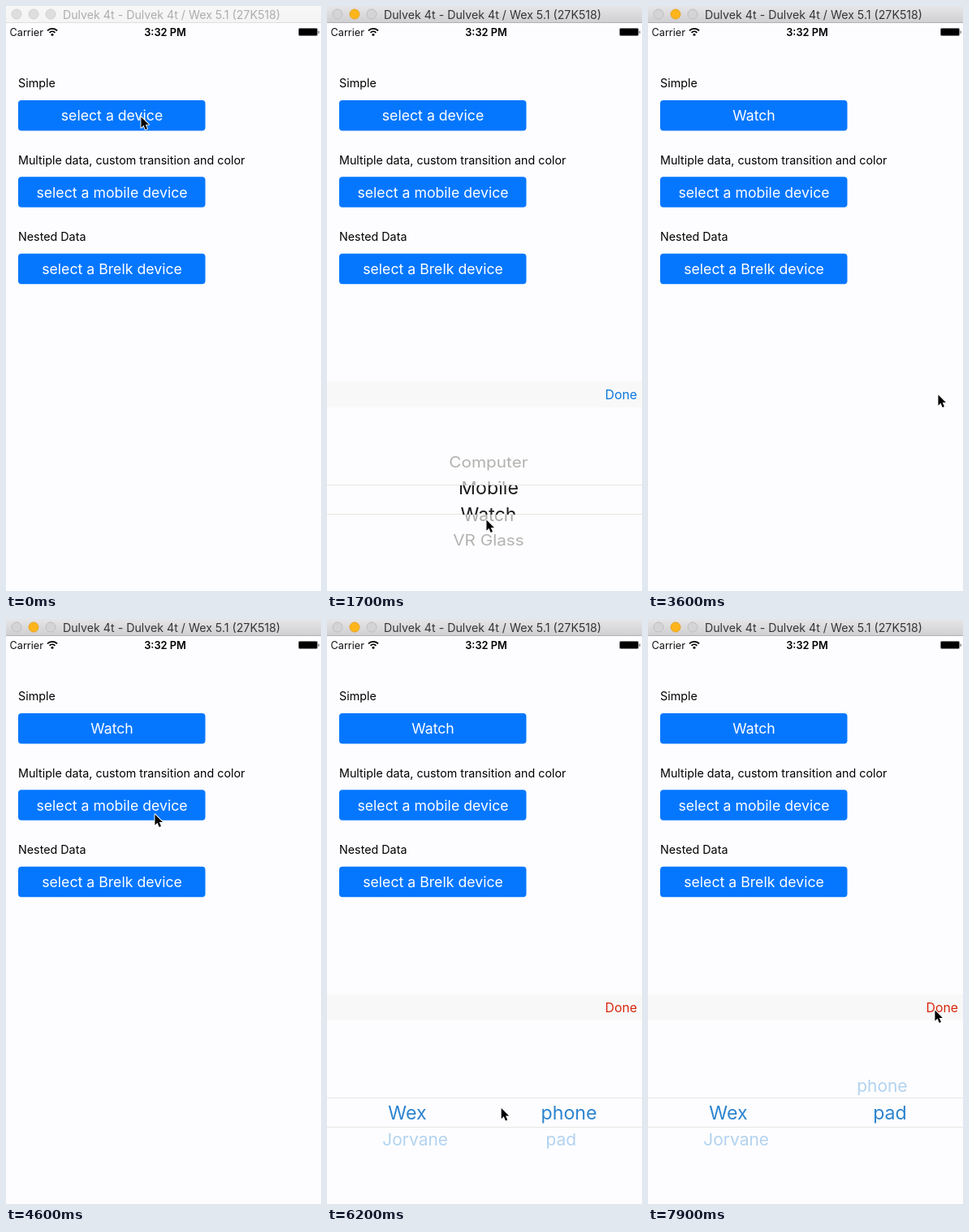
An HTML page with a canvas that plays this animation: 388 by 720 pixels, repeating every 8 s.

```html
<!DOCTYPE html>
<html lang="en">
<head>
<meta charset="utf-8">
<title>Picker demo</title>
<style>
html, body { margin: 0; width: 100%; height: 100%; overflow: hidden; background: #fdfdff; }
canvas { display: block; width: 388px; height: 720px; }
</style>
</head>
<body>
<canvas id="stage"></canvas>
<script>
const W = 388, H = 720, LOOP = 8000, STEP = 100;
const PAPER = '#fdfdff', LINE = '#e6e6e4';
const canvas = document.getElementById('stage');
const ctx = canvas.getContext('2d');
const dpr = window.devicePixelRatio || 1;
canvas.width = W * dpr;
canvas.height = H * dpr;

const clamp = u => Math.max(0, Math.min(1, u));
const span = (t, a, b) => clamp((t - a) / (b - a));
const smooth = u => (1 - Math.cos(Math.PI * u)) / 2;
const easeOut = u => 1 - Math.pow(1 - u, 3);
const mix = (a, b, u) => a + (b - a) * u;

// Cursor stops: time, x, y
const path = [
  [0, 166, 136], [300, 166, 138], [700, 176, 180], [900, 183, 221],
  [1300, 190, 692], [1400, 190, 692], [1850, 198, 612], [2100, 200, 606],
  [2600, 345, 489], [2800, 357, 478], [3700, 357, 478], [4400, 183, 238],
  [4600, 183, 240], [4900, 184, 240], [5500, 215, 567], [5800, 215, 600],
  [6400, 214, 602], [7000, 212, 552], [7300, 212, 552], [7900, 353, 481]
];

function cursorAt(t) {
  let i = 0;
  while (i < path.length - 2 && path[i + 1][0] <= t) i++;
  const [t0, x0, y0] = path[i], [t1, x1, y1] = path[i + 1];
  const u = smooth(span(t, t0, t1));
  return [mix(x0, x1, u), mix(y0, y1, u)];
}

// y is the middle of the capital letters
function text(str, x, y, size, color, align = 'left', weight = 400) {
  ctx.font = `${weight} ${size}px Inter, Roboto, sans-serif`;
  ctx.textAlign = align;
  ctx.fillStyle = color;
  ctx.fillText(str, x, y + size * 0.364);
}

function rect(x, y, w, h, color, r = 0) {
  ctx.fillStyle = color;
  ctx.beginPath();
  ctx.roundRect(x, y, w, h, r);
  ctx.fill();
}

function dot(x, y, r, fill, stroke) {
  ctx.beginPath();
  ctx.arc(x, y, r, 0, 7);
  ctx.fillStyle = fill;
  ctx.fill();
  if (stroke) {
    ctx.strokeStyle = stroke;
    ctx.lineWidth = 1;
    ctx.stroke();
  }
}

function titleBar(active) {
  const g = ctx.createLinearGradient(0, 0, 0, 20);
  g.addColorStop(0, active ? '#e6e5e7' : '#f7f7f7');
  g.addColorStop(1, active ? '#d0cfd2' : '#f4f4f4');
  rect(0, 0, W, 20, g);
  rect(0, 20, W, 1, active ? '#b2b1b4' : '#dedede');
  const gray = active ? '#d4d3d5' : '#dedede', edge = active ? '#bfbec0' : '#d0d0d0';
  [13, 34, 55].forEach((x, i) => {
    const lit = active && i === 1;
    dot(x, 10, 6, lit ? '#fdb51b' : gray, lit ? '#e8a524' : edge);
  });
  text('Dulvek 4t - Dulvek 4t / Wex 5.1 (27K518)', 204, 10.5, 14.2,
    active ? '#353535' : '#adadad', 'center');
}

function statusBar() {
  text('Carrier', 4.5, 32.5, 12.7, '#111');
  ctx.strokeStyle = '#000';
  ctx.lineWidth = 1.8;
  [4.6, 8.2].forEach(r => {
    ctx.beginPath();
    ctx.arc(57, 36, r, -Math.PI * 0.76, -Math.PI * 0.24);
    ctx.stroke();
  });
  dot(57, 35.2, 1.5, '#000');
  text('3:32 PM', 196, 32.5, 12.8, '#000', 'center', 600);
  rect(360, 27, 24, 10, '#77777a', 2);
  rect(361, 28, 22, 8, '#000', 1);
  rect(384.4, 30.5, 1.4, 3.5, '#77777a', 0.7);
}

function field(label, value, y) {
  text(label, 15, y - 40, 14.3, '#000');
  rect(15, y - 19, 230.5, 37.5, '#0577ff', 4);
  text(value, 130.5, y, 17.7, '#fff', 'center');
}

const MID = 608, RADIUS = 86.5, ANGLE = 0.3917, AXIS = 198.5, BAND = [590, 626];

// Rows sit on a drum; rows in the band are magnified
function wheel(col, inBand, color) {
  col.rows.forEach((name, i) => {
    const a = (i - col.pos) * ANGLE;
    if (Math.abs(a) > 1.5) return;
    const k = inBand ? 1 : 0.82 + 0.09 * Math.cos(a);
    ctx.save();
    ctx.translate(mix(AXIS, col.x, k), MID + RADIUS * Math.sin(a));
    ctx.scale(k, k * Math.cos(a) / (inBand ? 1 : 0.95));
    if (!inBand) ctx.globalAlpha = 0.4 + 0.6 * Math.cos(a);
    text(name, 0, 0, 23.2, color, 'center');
    ctx.restore();
  });
}

function clipped(areas, draw) {
  ctx.save();
  ctx.beginPath();
  areas.forEach(([top, bottom]) => ctx.rect(0, top, W, bottom - top));
  ctx.clip();
  draw();
  ctx.restore();
}

function picker(cols, theme) {
  rect(0, 462, W, 258, PAPER);
  rect(0, 462, W, 32, '#f8f8f8');
  text('Done', 382, 478, 15.8, theme.done, 'right');
  BAND.forEach(y => rect(0, y - 1, W, 1, LINE));
  clipped([[495, BAND[0]], [BAND[1], H]], () => cols.forEach(c => wheel(c, false, theme.off)));
  clipped([BAND], () => cols.forEach(c => wheel(c, true, theme.on)));
}

const plain = { done: '#0a78e0', on: '#1c1c1c', off: '#a9a9a6' };
const tinted = { done: '#d9260b', on: '#2c84cf', off: '#aed0ee' };

function simplePicker(t) {
  const shown = smooth(span(t, 300, 750)) - smooth(span(t, 2900, 3400));
  if (shown <= 0) return;
  const pos = 2 * easeOut(span(t, 1400, 2250));
  ctx.save();
  ctx.translate(0, 258 * (1 - shown));
  picker([{ rows: ['Computer', 'Mobile', 'Watch', 'VR Glass'], x: 199, pos }], plain);
  ctx.restore();
}

function doublePicker(t) {
  const rest = 1 - smooth(span(t, 4950, 5560));
  if (rest >= 1) return;
  const pos = 1.236 * smooth(span(t, 6400, 6900)) - 0.236 * easeOut(span(t, 7000, 7350));
  const scale = 1 - 0.9 * rest;
  ctx.save();
  ctx.translate(194, 591 - 135 * rest);
  ctx.rotate(-Math.PI / 6 * rest);
  ctx.scale(scale, scale);
  ctx.translate(-194, -591);
  picker([
    { rows: ['Wex', 'Jorvane'], x: 99, pos: 0 },
    { rows: ['phone', 'pad'], x: 298, pos }
  ], tinted);
  ctx.restore();
}

function cursor(x, y) {
  ctx.save();
  ctx.translate(x, y);
  ctx.scale(0.92, 0.92);
  ctx.beginPath();
  [[0.5, 0.5], [0.5, 15], [3.8, 11.8], [6.2, 17.4], [8.7, 16.3], [6.3, 10.8], [10.8, 10.8]]
    .forEach(p => ctx.lineTo(...p));
  ctx.closePath();
  ctx.lineJoin = 'round';
  ctx.lineWidth = 2;
  ctx.strokeStyle = '#fff';
  ctx.stroke();
  ctx.fillStyle = '#000';
  ctx.fill();
  ctx.restore();
}

function draw(t) {
  ctx.setTransform(dpr, 0, 0, dpr, 0, 0);
  rect(0, 0, W, H, PAPER);
  simplePicker(t);
  doublePicker(t);
  titleBar(t >= 200);
  statusBar();
  field('Simple', t < 2900 ? 'select a device' : 'Watch', 135);
  field('Multiple data, custom transition and color', 'select a mobile device', 229.3);
  field('Nested Data', 'select a Brelk device', 323.8);
  cursor(...cursorAt(t));
}

const start = performance.now();
function tick() {
  const t = (performance.now() - start) % LOOP;
  draw(Math.floor(t / STEP) * STEP);
  requestAnimationFrame(tick);
}
tick();
</script>
</body>
</html>
```
